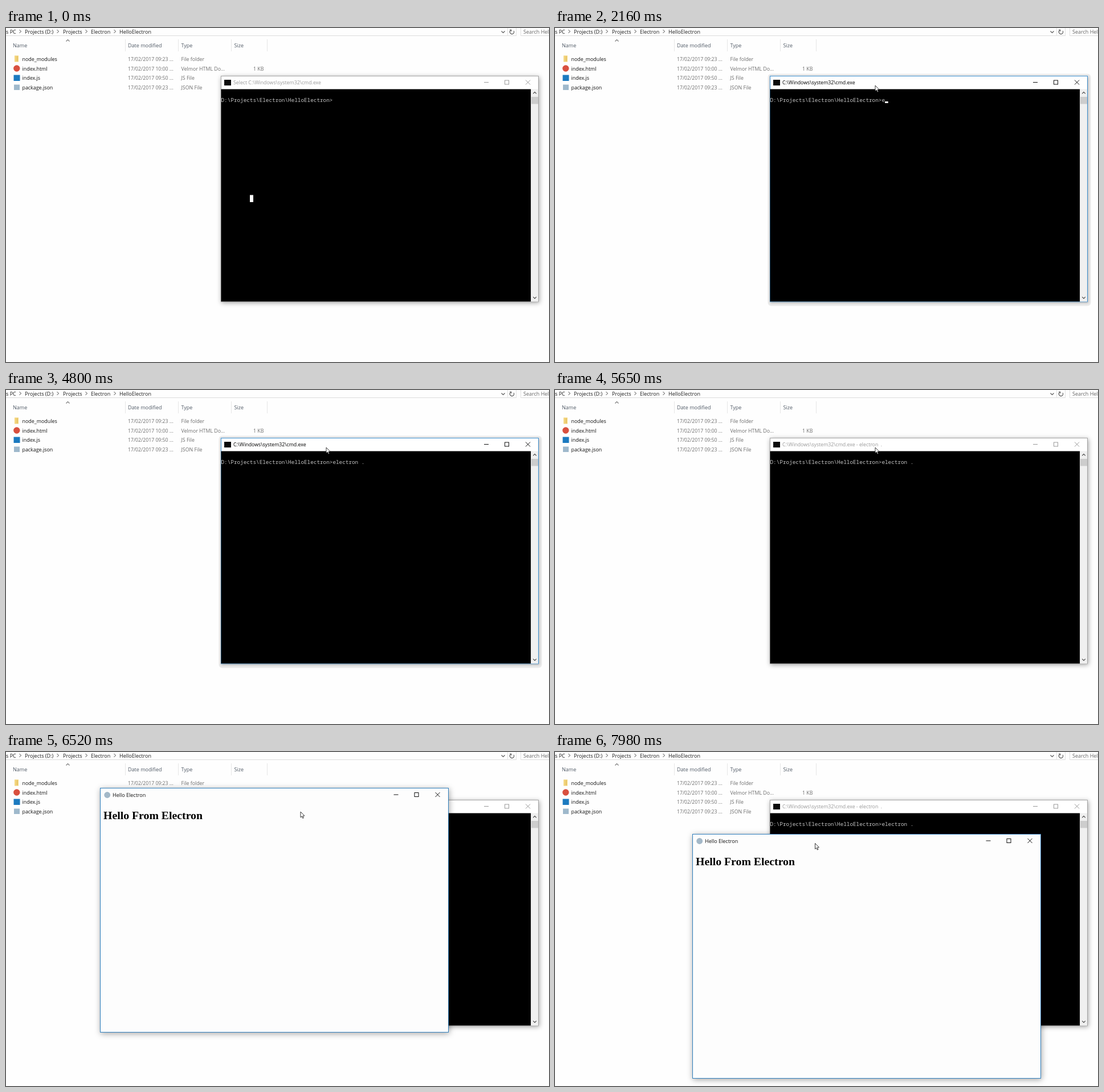
Recreate the animation shown at these times as an HTML page with a canvas. Size 953 by 587 pixels, loop 8 s.

```html
<!DOCTYPE html>
<html lang="en">
<head>
<meta charset="utf-8">
<title>Hello Electron</title>
<style>
html, body { margin: 0; width: 100%; height: 100%; overflow: hidden; background: #fff; }
canvas { display: block; }
</style>
</head>
<body>
<canvas id="stage" width="953" height="587"></canvas>
<script>
const c = document.getElementById('stage').getContext('2d');
const LOOP = 8000;
const UI = '"Open Sans", "Noto Sans", sans-serif';
const MONO = '"Noto Sans Mono", "DejaVu Sans Mono", monospace';
const SERIF = '"Liberation Serif", "Noto Serif", serif';
const CELL = 5.6;
const PROMPT = 'D:\\Projects\\Electron\\HelloElectron>';
const COMMAND = 'electron .';

// Time of each key press, the last one is Enter
const KEYS = [2160, 2310, 2710, 2860, 3240, 3320, 3550, 3810, 4020, 4570, 5180];
// Caret state changes: time, visible
const CARET = [[0, 0], [1700, 1], [2230, 0], [2310, 1], [4340, 0], [4570, 1], [4800, 0], [5180, 1], [5350, 0]];
// Pointer after it has come in: time, x, y
const GLIDE = [[0, 562, 101], [6520, 517, 105], [6597, 480, 109], [6674, 448, 107],
  [6750, 420, 99], [6827, 400, 89], [6904, 387, 82], [6980, 380.5, 79.5]];
// Window drag: time, dx, dy
const DRAG = [[0, 0, 0], [7360, 14, 28], [7440, 42, 69], [7520, 60, 92], [7600, 66, 94],
  [7670, 68, 92], [7900, 72, 86], [7980, 76, 81]];

const held = (list, t) => list.filter(k => k[0] <= t).pop();

function text(s, x, y, color = '#000', size = 9, family = UI, weight = '') {
  c.font = `${weight} ${size}px ${family}`;
  c.fillStyle = color;
  c.fillText(s, x, y);
}

function rect(x, y, w, h, color) {
  c.fillStyle = color;
  c.fillRect(x, y, w, h);
}

function dot(x, y, r, color) {
  c.fillStyle = color;
  c.beginPath();
  c.arc(x, y, r, 0, 7);
  c.fill();
}

function line(points, color, width = 1) {
  c.strokeStyle = color;
  c.lineWidth = width;
  c.beginPath();
  points.forEach(([x, y]) => c.lineTo(x, y));
  c.stroke();
}

function frame(x, y, w, h, color) {
  c.strokeStyle = color;
  c.lineWidth = 1;
  c.strokeRect(x, y, w, h);
}

function shadowed(x, y, w, h, color, blur, alpha) {
  c.save();
  c.shadowColor = `rgba(0,0,0,${alpha})`;
  c.shadowBlur = blur;
  c.shadowOffsetX = 1;
  c.shadowOffsetY = 2;
  rect(x, y, w, h, color);
  c.restore();
}

const chevron = (x, y, s, color, dir = 1) =>
  line([[x - s, y - dir * s / 2], [x, y + dir * s / 2], [x + s, y - dir * s / 2]], color, 1.1);

function windowButtons(right, y, color) {
  line([[right - 96, y], [right - 88, y]], color);
  frame(right - 59.5, y - 3.5, 7, 7, color);
  line([[right - 23, y - 4], [right - 15, y + 4]], color);
  line([[right - 15, y - 4], [right - 23, y + 4]], color);
}

function explorer() {
  rect(0, 0, 953, 587, '#fefefe');
  rect(0, 13, 896, 1, '#dcdcdc');
  rect(903, 13, 50, 1, '#dcdcdc');
  [880, 895, 903].forEach(x => rect(x, 0, 1, 14, '#e2e2e2'));

  [['s PC', 0], ['Projects (D:)', 33], ['Projects', 100], ['Electron', 149], ['HelloElectron', 199]]
    .forEach(([s, x]) => text(s, x, 9.5, '#1c1c1c'));
  [25, 91, 141, 191].forEach(x => line([[x - 1.5, 3], [x + 1.5, 6], [x - 1.5, 9]], '#444'));
  chevron(872.5, 7, 3, '#555');
  c.strokeStyle = '#555';
  c.lineWidth = 1.2;
  c.beginPath();
  c.arc(888, 7, 3.6, -0.6, 4.1);
  c.stroke();
  line([[884, 3.2], [887, 3.2], [887, 6]], '#555');
  text('Search Hel', 908, 10, '#666');

  [['Name', 12], ['Date modified', 214], ['Type', 307.5], ['Size', 400.5]]
    .forEach(([s, x]) => text(s, x, 34, '#505a66'));
  [209, 302, 395, 458].forEach(x => rect(x, 20, 1, 21, '#e6e6e6'));
  chevron(108.5, 22, 3, '#777', -1);

  const rows = [
    ['node_modules', '09:23', 'File folder'],
    ['index.html', '10:00', 'Velmor HTML Do...'],
    ['index.js', '09:50', 'JS File'],
    ['package.json', '09:23', 'JSON File']
  ];
  rows.forEach(([name, time, type], i) => {
    const y = 57.8 + i * 16.8;
    text(name, 28.5, y, '#111', 8.9);
    text(`17/02/2017 ${time} ...`, 214, y, '#6d6d6d', 8.7);
    text(type, 307.5, y, '#6d6d6d', 8.8);
  });
  text('1 KB', 434, 74.6, '#6d6d6d', 8.8);

  rect(15, 48.5, 7, 11, '#f3d57d');
  rect(19, 49.5, 1, 9, '#d9b45a');
  dot(18.8, 71, 5.7, '#d9503f');
  rect(13.5, 82.5, 11, 10.5, '#1b7ac0');
  rect(14, 99.5, 10, 9.5, '#9fb9cc');
}

function terminal(t) {
  const active = t >= 1150 && t < 5580;
  if (active) {
    c.fillStyle = '#ebebeb';
    c.beginPath();
    c.roundRect(373.5, 80.5, 567, 408, 6);
    c.fill();
  }
  shadowed(377, 84, 558, 397, '#fff', active ? 4 : 8, active ? 0.25 : 0.38);
  frame(377.5, 84.5, 557, 396.5, active ? '#3c8fd0' : '#a5a5a5');
  rect(377.5, 107.5, 543.8, 373.2, '#000');
  rect(921.3, 107.5, 12.7, 373.2, '#f0f0f0');
  rect(922, 121, 12, 12.5, '#cdcdcd');
  chevron(928, 114, 2.8, '#444', -1);
  chevron(928, 474, 2.8, '#444');

  rect(383, 91, 12, 10, '#0a0a0a');
  const title = (t < 1150 ? 'Select ' : '') + 'C:\\Windows\\system32\\cmd.exe' +
    (t >= 5180 ? ' - electron  .' : '');
  text(title, 399, 99.3, active ? '#000' : '#999', 8.75);
  windowButtons(935, 95.5, active ? '#111' : '#999');

  const typed = KEYS.filter(k => k <= t).length;
  text(PROMPT + COMMAND.slice(0, typed), 377.5, 129.7, '#c4c4c4', CELL / 0.6, MONO);
  if (t < 1150) rect(428, 293.5, 6, 12.5, '#fff');
  if (held(CARET, t)[1]) {
    const entered = typed > COMMAND.length;
    const col = entered ? 0 : PROMPT.length + typed;
    rect(377.5 + col * CELL, entered ? 141 : 129, CELL, 3, '#fff');
  }
}

function appWindow(t) {
  if (t < 5740) return;
  const [, dx, dy] = held(DRAG, t);
  c.save();
  c.translate(dx, dy);
  if (t < 5820) {
    c.globalAlpha = 0.6;
    c.translate(471, 278);
    c.scale(0.96, 0.96);
    c.translate(-471, -278);
  }
  shadowed(165, 63, 612, 430, '#fdfdfd', 10, 0.36);
  frame(165.5, 63.5, 611, 429, '#2f7fbd');
  dot(177.7, 75.5, 5.4, '#a3b8c8');
  text('Hello Electron', 187, 79, '#111');
  windowButtons(776.5, 75, '#111');
  if (t >= 5890) text('Hello From Electron', 171, 118, '#000', 19.8, SERIF, 'bold');
  c.restore();
}

function pointer(t) {
  if (t < 210) return;
  let [, x, y] = held(GLIDE, t);
  if (t < 980) {
    const left = (1 - Math.floor((t - 210) / 77) / 10) ** 2;
    x += 219 * left;
    y += 344 * left;
  }
  const [, dx, dy] = held(DRAG, t);
  c.save();
  c.translate(x + dx, y + dy);
  c.beginPath();
  [[0, 0], [0, 10], [2.3, 8], [3.8, 11.5], [5.4, 10.8], [3.9, 7.4], [6.9, 7.1]]
    .forEach(p => c.lineTo(...p));
  c.closePath();
  c.fillStyle = '#fff';
  c.fill();
  c.strokeStyle = '#222';
  c.lineWidth = 0.9;
  c.stroke();
  c.restore();
}

function draw(now) {
  const t = now % LOOP;
  explorer();
  terminal(t);
  appWindow(t);
  pointer(t);
}

const start = performance.now();
function tick() {
  draw(performance.now() - start);
  requestAnimationFrame(tick);
}
tick();
</script>
</body>
</html>
```
